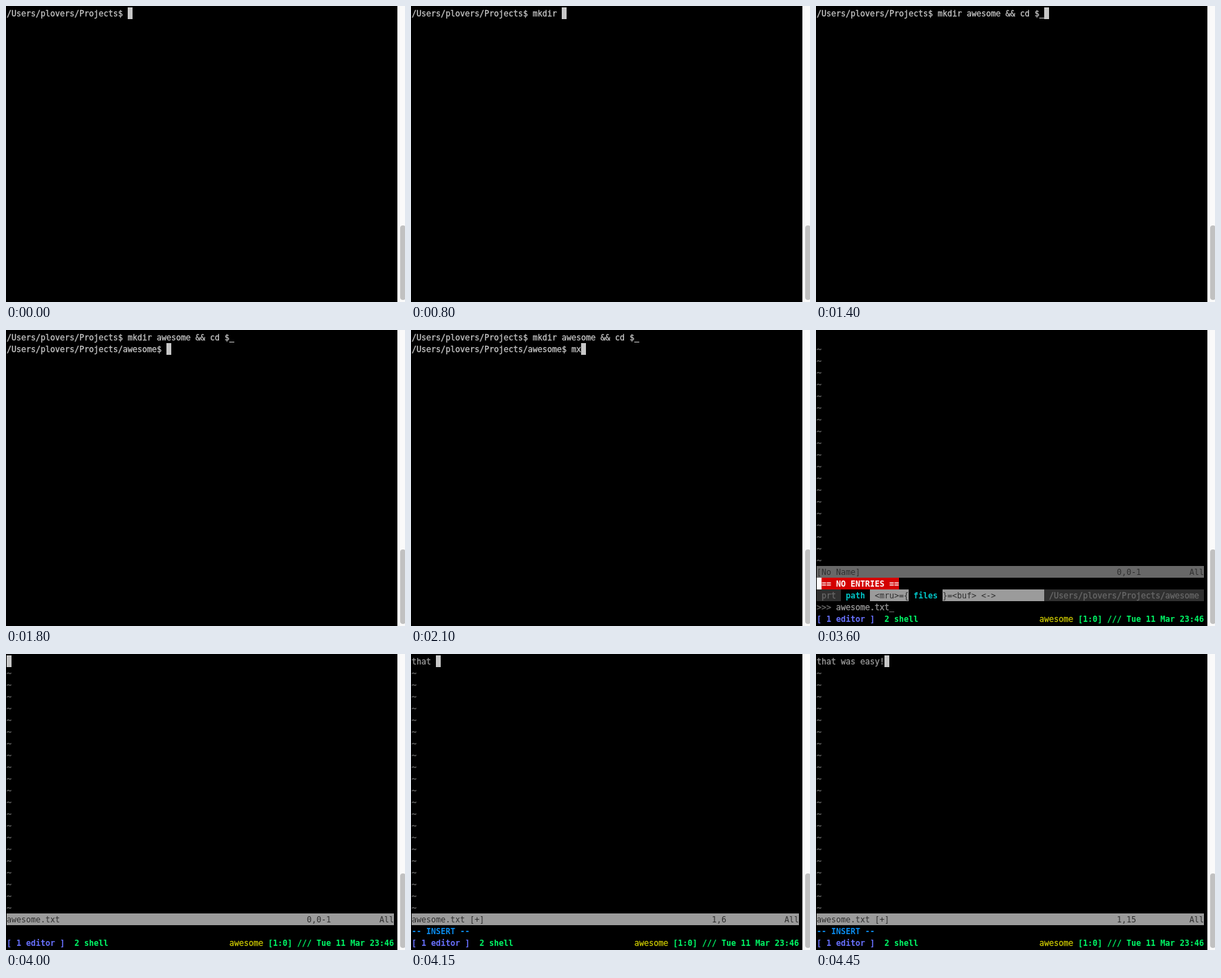
Recreate the animation shown at these times as an HTML page with a canvas. Size 577x429 px, loop 7.45 s.

```html
<!DOCTYPE html>
<html lang="en">
<head>
<meta charset="utf-8">
<title>Terminal session</title>
<style>
  html, body { margin: 0; width: 100%; height: 100%; overflow: hidden; background: #000; }
  canvas { display: block; }
</style>
</head>
<body>
<canvas id="screen" width="577" height="429"></canvas>
<script>
const ctx = document.getElementById('screen').getContext('2d');
const LOOP = 7450, CELL_W = 7, CELL_H = 17, LEFT = 1, TOP = 2, COLS = 80;
const LIGHT = '#c7c7c7', GREY = '#9b9b9b', DIM = '#686868', DARK = '#303030';
const CYAN = '#00c5c7', GREEN = '#00fa67', PURPLE = '#6871ff', YELLOW = '#c7c400';
const home = '/Users/plovers/Projects';
const command = 'mkdir awesome && cd $_';
const message = 'that was easy!';

// Each entry: start time, number of characters typed by then
const commandSteps = [[0, 0], [800, 6], [950, 14], [1100, 17], [1250, 20], [1400, 22]];
const messageSteps = [[4000, 0], [4150, 5], [4300, 9], [4450, 14]];
const typed = (text, steps, t) => text.slice(0, steps.filter(s => s[0] <= t).pop()[1]);

function fill(row, col, count, color) {
  ctx.fillStyle = color;
  ctx.fillRect(LEFT + col * CELL_W, TOP + row * CELL_H, count * CELL_W, CELL_H);
}

function write(row, col, text, color, { bold = false, thick = !bold, bg } = {}) {
  if (bg) fill(row, col, text.length, bg);
  ctx.font = (bold ? 'bold ' : '') + '11.63px "DejaVu Sans Mono", monospace';
  const x = LEFT + col * CELL_W, y = TOP + row * CELL_H + 13;
  ctx.fillStyle = ctx.strokeStyle = color;
  ctx.fillText(text, x, y);
  if (thick) {
    ctx.lineWidth = 0.3;
    ctx.strokeText(text, x, y);
  }
}

const cursor = (row, col) => fill(row, col, 1, LIGHT);

function scrollbar() {
  ctx.fillStyle = '#fafafa';
  ctx.fillRect(566, 0, 11, 429);
  ctx.fillStyle = '#c1c1c1';
  ctx.beginPath();
  ctx.roundRect(570, 318, 8, 108, 4);
  ctx.fill();
}

function shell(t) {
  const first = home + '$ ' + typed(command, commandSteps, t);
  write(0, 0, first, LIGHT);
  if (t < 1800) return cursor(0, first.length);
  const second = home + '/awesome$ ' + (t < 2100 ? '' : 'mx');
  write(1, 0, second, LIGHT);
  cursor(1, second.length);
}

function statusLine(row, name, position, bg) {
  fill(row, 0, COLS, bg);
  const plain = { thick: false };
  write(row, 0, name, DARK, plain);
  write(row, 62, position, DARK, plain);
  write(row, 77, 'All', DARK, plain);
}

function tildes(last) {
  for (let row = 1; row <= last; row++) write(row, 0, '~', DIM);
}

function windowBar(t) {
  const bold = { bold: true };
  write(24, 0, '[ 1 editor ]', PURPLE, bold);
  write(24, 14, '2 shell', GREEN, bold);
  write(24, 46, 'awesome', YELLOW);
  write(24, 54, '[1:0] /// Tue 11 Mar 23:' + (t < 3600 ? 45 : 46), GREEN, bold);
}

function finder(t) {
  tildes(19);
  statusLine(20, '[No Name]', '0,0-1', DIM);
  fill(21, 0, 1, '#fff');
  write(21, 1, '== NO ENTRIES ==', '#fff', { bold: true, bg: '#d40000' });
  write(22, 0, ' prt ', DIM, { bg: DARK });
  write(22, 5, ' path ', CYAN, { bold: true });
  fill(22, 11, 36, GREY);
  write(22, 11, ' <mru>={', DARK, { thick: false });
  write(22, 19, ' files ', CYAN, { bold: true, bg: '#000' });
  write(22, 26, '}=<buf> <->', DARK, { thick: false });
  write(22, 47, ` ${home}/awesome `, DIM, { bg: DARK });
  write(23, 0, '>>>', DIM);
  write(23, 4, (t < 3600 ? '' : 'awesome.txt'), GREY);
  write(23, t < 3600 ? 4 : 15, '_', DIM);
}

function editor(t) {
  const text = typed(message, messageSteps, t), n = text.length;
  tildes(21);
  write(0, 0, text, GREY);
  cursor(0, n);
  statusLine(22, 'awesome.txt' + (n ? ' [+]' : ''), n ? '1,' + (n + 1) : '0,0-1', GREY);
  if (n) write(23, 0, '-- INSERT --', '#0a8cf0', { bold: true });
}

function draw(now) {
  const t = now % LOOP;
  ctx.fillStyle = '#000';
  ctx.fillRect(0, 0, 577, 429);
  scrollbar();
  if (t < 3100) {
    shell(t);
  } else {
    (t < 4000 ? finder : editor)(t);
    windowBar(t);
  }
}

const start = performance.now();
function tick() {
  draw(performance.now() - start);
  requestAnimationFrame(tick);
}
tick();
</script>
</body>
</html>
```
